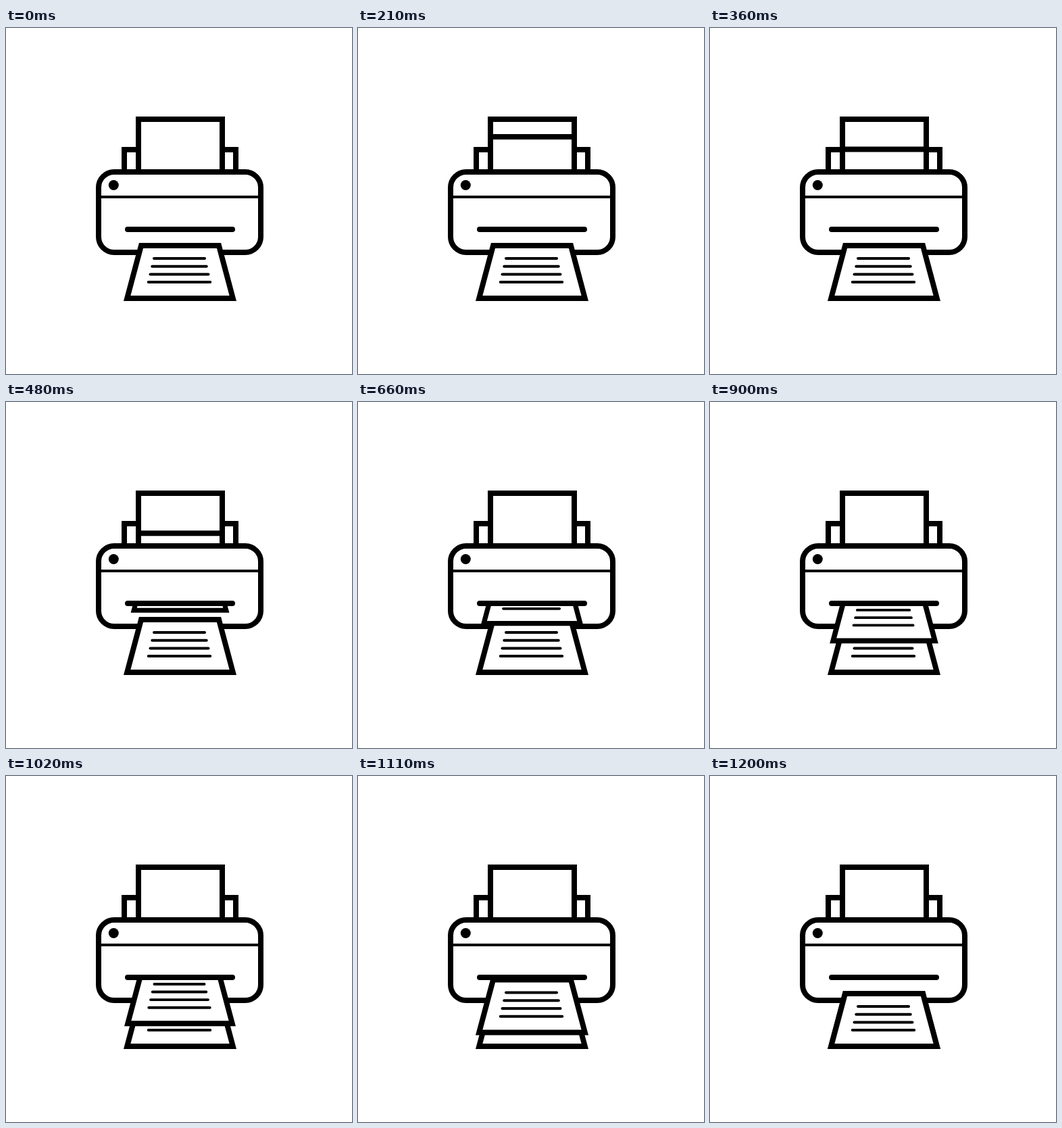
Animation of 512x512 px, one loop 1650 ms. Source, as an HTML page with a canvas:

```html
<!DOCTYPE html>
<html lang="en">
<head>
<meta charset="utf-8">
<title>Printer</title>
<style>
  html, body { margin: 0; width: 100%; height: 100%; overflow: hidden; background: #fff; }
  canvas { display: block; }
</style>
</head>
<body>
<canvas id="stage" width="512" height="512"></canvas>
<script>
const ctx = document.getElementById('stage').getContext('2d');
const LOOP = 1650, STEP = 30;
const OUT_STEP = 36, END_STEP = 40;
const SLOT_Y = 298, OUT_Y = 372.7, REST_Y = 400;

function line(points, width, closed = false, cap = 'butt') {
  ctx.beginPath();
  points.forEach(([x, y]) => ctx.lineTo(x, y));
  if (closed) {
    ctx.closePath();
    ctx.fill();
  }
  ctx.lineWidth = width;
  ctx.lineCap = cap;
  ctx.stroke();
}

// Printed page, anchored at the middle of its bottom edge.
function page(bottom, scale) {
  ctx.save();
  ctx.translate(257.5, bottom);
  ctx.scale(scale, scale);
  line([[-57.5, -78], [57.5, -78], [78.3, 0], [-78.3, 0]], 8, true);
  for (let i = 0; i < 4; i++) {
    const half = 37.5 + 2.75 * i, y = -59 + 11.7 * i;
    line([[-1 - half, y], [-1 + half, y]], 4, false, 'round');
  }
  ctx.restore();
}

function printer(feedY) {
  line([[175, 213], [175, 180], [340, 180], [340, 213]], 8);
  line([[196, 213], [196, 135], [320, 135], [320, 213]], 8, true);
  line([[196, feedY], [320, feedY]], 8);

  ctx.beginPath();
  ctx.roundRect(137, 213, 240, 119, 23);
  ctx.fill();
  ctx.lineWidth = 8;
  ctx.stroke();
  line([[137, 250], [377, 250]], 4);

  ctx.fillStyle = '#000';
  ctx.beginPath();
  ctx.arc(159.3, 232.5, 7.5, 0, 2 * Math.PI);
  ctx.fill();
  ctx.fillStyle = '#fff';
}

function newPage(step) {
  const left = Math.max(0, OUT_STEP - step);
  const drop = Math.max(0, step - OUT_STEP) / (END_STEP - OUT_STEP);
  const bottom = OUT_Y - 3.22 * left + (REST_Y - OUT_Y) * drop;
  ctx.save();
  ctx.beginPath();
  ctx.rect(0, SLOT_Y, 512, 512 - SLOT_Y);
  ctx.clip();
  page(bottom, 1 - 0.00635 * left);
  ctx.restore();
}

function draw(time) {
  const step = Math.min(END_STEP, Math.floor((time % LOOP) / STEP));
  ctx.fillStyle = '#fff';
  ctx.strokeStyle = '#000';
  ctx.fillRect(0, 0, 512, 512);
  printer(Math.min(213, 135 + 3.7 * step));
  page(REST_Y, 1);
  newPage(step);
  line([[180, SLOT_Y], [335, SLOT_Y]], 8, false, 'round');
}

const start = performance.now();
function tick() {
  draw(performance.now() - start);
  requestAnimationFrame(tick);
}
tick();
</script>
</body>
</html>
```
